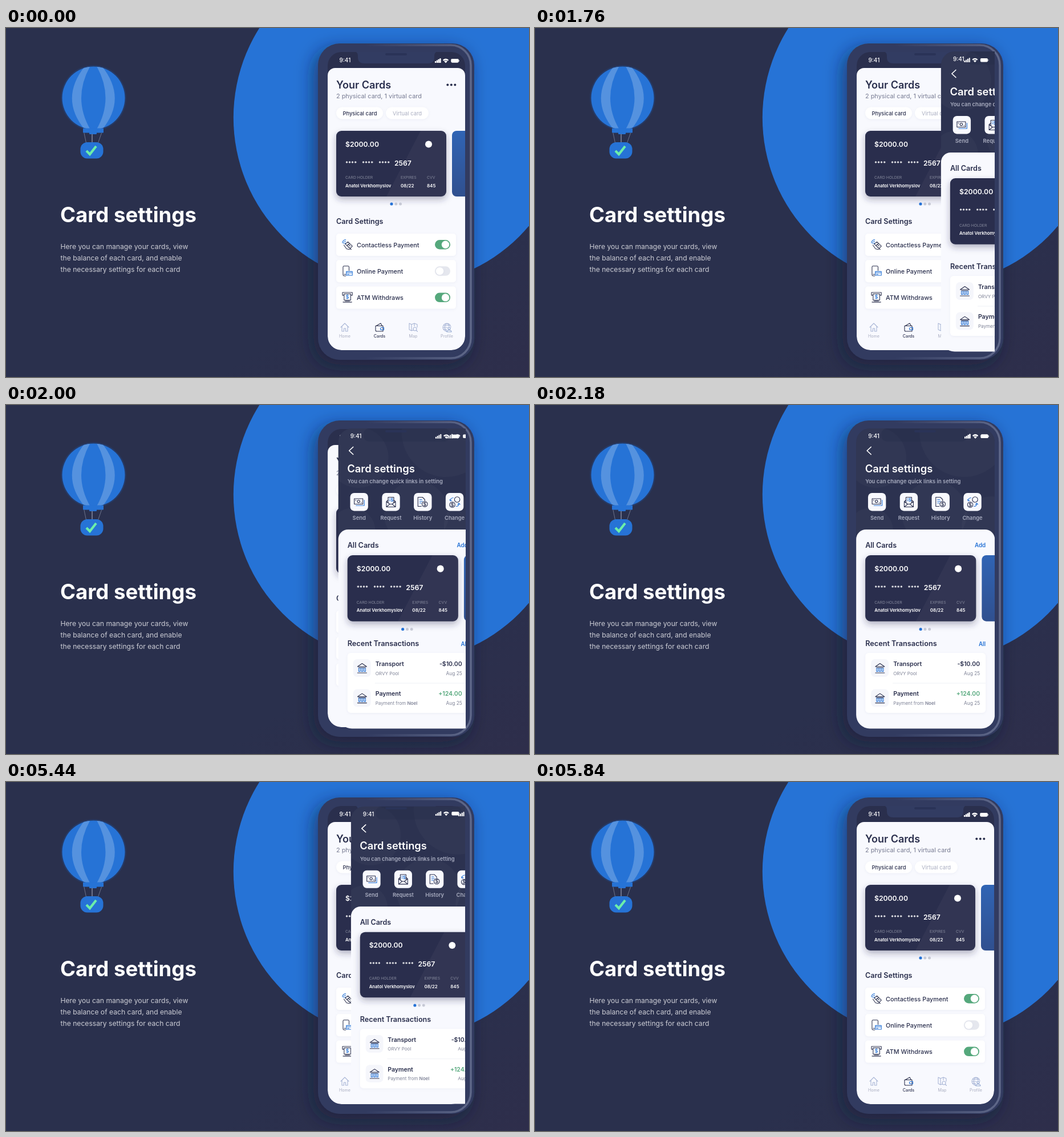
An HTML page for the animation above (8680 ms loop, 917 by 611 pixels).

```html
<!DOCTYPE html>
<html lang="en">
<head>
<meta charset="utf-8">
<title>Card settings</title>
<style>
html, body { margin: 0; height: 100%; overflow: hidden; background: #2a304d; }
svg { display: block; font-family: Inter, sans-serif; }
.icon { fill: none; stroke-linecap: round; stroke-linejoin: round; }
</style>
</head>
<body>
<svg id="stage" width="917" height="611" viewBox="0 0 917 611"></svg>
<script>
const NAVY = '#2a2f4d', BLUE = '#2673d6', MUTED = '#7f8397', PALE = '#a9adc0', GREEN = '#55a87c';

const text = (x, y, str, size, weight = 400, fill = NAVY, anchor = 'start') =>
  `<text x="${x}" y="${y}" font-size="${size}" font-weight="${weight}" fill="${fill}" text-anchor="${anchor}">${str}</text>`;
const rect = (x, y, w, h, r, fill, extra = '') =>
  `<rect x="${x}" y="${y}" width="${w}" height="${h}" rx="${r}" fill="${fill}" ${extra}/>`;
const dot = (x, y, r, fill, extra = '') => `<circle cx="${x}" cy="${y}" r="${r}" fill="${fill}" ${extra}/>`;
const at = (x, y, body, scale = 1) => `<g transform="translate(${x} ${y}) scale(${scale})">${body}</g>`;
const line = (d, color, width = 1.1) => `<path class="icon" d="${d}" stroke="${color}" stroke-width="${width}"/>`;
const ring = (x, y, r, color) => dot(x, y, r, 'none', `stroke="${color}" stroke-width="1.1"`);
const dollar = (x, y, size, color) => text(x, y, '$', size, 600, color, 'middle');
const soft = 'filter="url(#soft)"';

const icons = {
  contactless: line('M1 7a6 6 0 0 1 6-6M3 8a4 4 0 0 1 4-4M5 8.5l2-1.5', BLUE)
    + line('M6 9l5-4 8 8-4 4zM9 12l5-4M3.5 11l5 7 6 1M11 14l6 5M12 10l3 3', NAVY),
  online: line('M13 9V3a2 2 0 0 0-2-2H4a2 2 0 0 0-2 2v14a2 2 0 0 0 2 2h3M4 16h3', NAVY)
    + line('M8 11h11v7h-11zM8 13.5h11M10 16h3', BLUE),
  atm: line('M4 6H1V1h18v5h-3M4 3.5h12V15H4zM2 18.5h16M6 16.5h8', NAVY) + dollar(10, 12.7, 9, BLUE),
  home: line('M1 8L8 1l7 7M3 7v8h3.5v-5h3v5H13V7', '#a9b6d6'),
  wallet: line('M1 5.5h13v9.5H3a2 2 0 0 1-2-2zM2 5.5L10 1l2.5 4.5', NAVY)
    + line('M15.5 8.5h-4a2 2 0 0 0 0 4h4z', BLUE),
  map: line('M1 1l4 2 5-2 5 2v5M1 1v11l4 2 3-1M5 3v11M10 1v5M13.5 13.5l2 2', '#a9b6d6') + ring(11, 11, 3, '#a9b6d6'),
  profile: line('M15 8A7 7 0 1 0 8 15M1 8h8M8 1c-5 4-5 10 0 14M8 1c3 2 4 3 4 6M2.5 4.5h11M2.5 11.5h5', '#a9b6d6')
    + ring(12, 10, 2, '#8fa5cf') + line('M8 16c0-4 8-4 8 0z', '#8fa5cf'),
  send: line('M18.5 3.5V13H4', BLUE) + line('M1 1h15v9.5H1zM3 3.5h1M13 8h1', NAVY) + ring(8.5, 5.7, 2.2, NAVY),
  request: line('M4 6L1 8.5V18h16V8.5L14 6M1 18l6-5h4l6 5M1 8.5l6 4.5M17 8.5L11 13M4 11V1h10v10', NAVY)
    + line('M6 4h2M6 7h2', BLUE) + dollar(11, 8.5, 8, BLUE),
  history: line('M7 17H1V1h8l4 4v2', NAVY) + line('M4 5h4M4 8h5M4 11h3', BLUE)
    + ring(13, 13, 4.8, NAVY) + dollar(13, 16.1, 8.5, NAVY),
  change: ring(5.5, 14, 4.7, NAVY) + dollar(5.5, 17.1, 8.5, NAVY) + ring(14, 5, 4.7, NAVY)
    + line('M2 7c0-3 2-5 5-5M1 5l1 2.5 2.5-1M17 12c0 3-2 5-5 5M15 13.5l2-2 2 2', BLUE),
  bank: line('M1 6.5L9 1l8 5.5zM1 17.5h16M3 8.5h12', NAVY)
    + line('M3 9v6h2.5V9M7.75 9v6h2.5V9M12.5 9v6H15V9', BLUE),
};

const statusIcons = [0, 1, 2, 3].map(i => rect(i * 2.8, 2.5 - i * 1.6, 2, 3 + i * 1.6, .5, '#fff')).join('')
  + '<path d="M14 .5Q19 -4 24 .5L22.6 2Q19 -1 15.4 2ZM16.3 2.8Q19 .7 21.7 2.8L19 5.7Z" fill="#fff"/>'
  + rect(28.5, -1.5, 13, 6.5, 1.8, '#fff') + rect(42, .5, 1, 2.5, .5, '#b9bccb');

const pager = (x, y) => dot(x, y, 2.6, BLUE) + dot(x + 7.8, y, 2.5, '#c6c9d5') + dot(x + 15.5, y, 2.5, '#c6c9d5');

const cardField = (x, label, value, size) =>
  text(x, 84, label, 6.8, 400, '#84889b') + text(x, 98.7, value, size, 600, '#fff');

const card = rect(0, 0, 193, 115, 9, NAVY, 'filter="url(#cardShadow)"')
  + '<path d="M148 0H184a9 9 0 0 1 9 9V106a9 9 0 0 1-9 9H88Z" fill="#fff" opacity=".035"/>'
  + text(16, 27.5, '$2000.00', 12.2, 600, '#fff')
  + [16, 45, 74].map(x => text(x, 59.5, '****', 9.4, 600, '#fff')).join('')
  + text(102, 61, '2567', 12.2, 600, '#fff')
  + cardField(16, 'CARD HOLDER', 'Anatol Verkhomyslov', 7.8) + cardField(113, 'EXPIRES', '08/22', 8) + cardField(159, 'CVV', '845', 8)
  + dot(162, 23.5, 6, '#fff')
  + rect(203, 0, 60, 115, 8, 'url(#blueCard)');

const settingRow = ([label, icon, on], i) => {
  const y = 360 + i * 46.3;
  return rect(579, y, 210, 39, 5, '#fff', soft) + at(589, y + 9.5, icons[icon], .96) + text(615, y + 23.5, label, 10.8, 500)
    + rect(752, y + 11, 27, 16.5, 8.25, on ? GREEN : '#e5e7ee') + dot(on ? 770.5 : 760.5, y + 19.3, 6.7, '#fff', on ? '' : soft);
};

const tab = ([label, icon, x], i) => at(x - 8, 516, icons[icon])
  + text(x, 542, label, 7.2, i === 1 ? 500 : 400, i === 1 ? NAVY : PALE, 'middle');

const cardsScreen = rect(564, 42, 241, 100, 22, '#2a2f4d')
  + '<path d="M612 41q5 2 5 8v2q0 11 11 11H740q11 0 11-11V49q0-6 5-8Z" fill="#323c62"/>'
  + text(584.5, 60.3, '9:41', 10, 500, '#fff') + at(752, 55.5, statusIcons)
  + '<path d="M564 83a13 13 0 0 1 13-13H792a13 13 0 0 1 13 13V540a24 24 0 0 1-24 24H588a24 24 0 0 1-24-24Z" fill="#f8f9fe"/>'
  + text(579, 105.7, 'Your Cards', 18, 600) + [774.3, 780.8, 787.3].map(x => dot(x, 99.5, 2, NAVY)).join('')
  + text(579, 123.2, '2 physical card, 1 virtual card', 10.9, 400, '#777b92')
  + rect(579, 138.5, 82, 21, 10.5, '#fff', soft) + text(620.5, 152.5, 'Physical card', 9.4, 500, NAVY, 'middle')
  + rect(666, 138.5, 75, 21, 10.5, '#fff', soft) + text(703.5, 152.5, 'Virtual card', 9.4, 400, PALE, 'middle')
  + at(579, 180, card) + pager(676, 308)
  + text(579, 342.5, 'Card Settings', 12.6, 600)
  + [['Contactless Payment', 'contactless', 1], ['Online Payment', 'online', 0], ['ATM Withdraws', 'atm', 1]].map(settingRow).join('')
  + [['Home', 'home', 594], ['Cards', 'wallet', 655], ['Map', 'map', 714], ['Profile', 'profile', 773]].map(tab).join('');

const quickLink = ([label, icon, w], i) => {
  const x = 599.5 + i * 55.8;
  return rect(x - 15.7, 154, 31.4, 31.4, 7, '#f8f9fe') + at(x - w / 2, icon === 'send' ? 163 : 160.5, icons[icon])
    + text(x, 201.2, label, 9.4, 600, PALE, 'middle');
};

const transaction = ([title, note, sum, color], i) => {
  const y = 445 + i * 52.6;
  return rect(589, y, 31, 31, 7, '#f5f6fb') + at(595.7, y + 6.5, icons.bank)
    + text(628, y + 11.8, title, 10.6, 600) + text(628, y + 27.5, note, 8.1, 400, MUTED)
    + text(780, y + 11.8, sum, 10.5, 600, color, 'end') + text(780, y + 27.5, 'Aug 25', 8.3, 400, MUTED, 'end');
};

const settingsScreen = rect(563, 41, 243, 250, 24, '#2c3250')
  + '<g fill="#fff" fill-opacity=".025" clip-path="url(#header)">'
  + [[598, 92, 53], [752, 48, 78], [700, 190, 57], [800, 212, 52], [588, 220, 40]].map(([x, y, r]) => `<circle cx="${x}" cy="${y}" r="${r}"/>`).join('') + '</g>'
  + rect(607, 41, 152, 23, 10, '#272d4a', 'opacity=".4"')
  + text(584, 58.2, '9:41', 10, 500, '#fff') + at(753, 53, statusIcons)
  + line('M589 73.5L582 80L589 86.5', '#fff', 1.7)
  + text(578.5, 117.5, 'Card settings', 18.4, 600, '#fff')
  + text(579, 137.3, 'You can change quick links in setting', 9.4, 600, PALE)
  + [['Send', 'send', 19], ['Request', 'request', 18], ['History', 'history', 19], ['Change', 'change', 19]].map(quickLink).join('')
  + '<path d="M563 235a17 17 0 0 1 17-17H789a17 17 0 0 1 17 17V542.5a24 24 0 0 1-24 24H587a24 24 0 0 1-24-24Z" fill="#f8f9fe"/>'
  + text(579, 249.8, 'All Cards', 12.6, 600) + text(790, 249, 'Add', 9.8, 600, BLUE, 'end')
  + at(579, 263, card, 1.006) + pager(676, 392.5)
  + text(579, 422, 'Recent Transactions', 12.7, 600) + text(790, 421.5, 'All', 9.8, 600, BLUE, 'end')
  + rect(579, 434, 211, 105, 6, '#fff', soft) + rect(627, 486.5, 163, 1, 0, '#f0f1f6')
  + [['Transport', 'ORVY Pool', '-$10.00', NAVY],
     ['Payment', 'Payment from <tspan font-weight="600">Noel</tspan>', '+124.00', GREEN]].map(transaction).join('');

const stripe = 'M139 66Q93 123 138 178H148Q116 123 148 66Z';
const balloon = dot(153.5, 122.5, 57.3, '#263a66') + dot(153.5, 122.5, 55, BLUE)
  + `<g fill="#5592df" clip-path="url(#envelope)"><path d="${stripe}"/><path d="${stripe}" transform="matrix(-1 0 0 1 306.5 0)"/></g>`
  + rect(135, 175.5, 36, 8, 1, BLUE) + rect(146, 182, 13, 4, 1, BLUE)
  + line('M137 184L140.5 201M150.5 186V201M151.5 186V201M167.5 184L161.5 201', '#747b92', .9)
  + rect(130.5, 200, 40, 28.5, 12, BLUE) + '<path d="M141 215L147 221L158 207" fill="none" stroke="#6ceeaa" stroke-width="4.2"/>';

const shadow = (id, dx, dy, blur, color, opacity) =>
  `<filter id="${id}" x="-30%" y="-60%" width="160%" height="220%"><feDropShadow dx="${dx}" dy="${dy}" stdDeviation="${blur}" flood-color="${color}" flood-opacity="${opacity}"/></filter>`;
const gradient = (id, dir, ...stops) => `<linearGradient id="${id}" ${dir}>`
  + stops.map(([o, c, a = 1]) => `<stop offset="${o}" stop-color="${c}" stop-opacity="${a}"/>`).join('') + '</linearGradient>';

document.getElementById('stage').innerHTML = '<defs>'
  + shadow('soft', 0, 1, 2, '#9aa3c4', .14) + shadow('cardShadow', 0, 5, 6, NAVY, .35) + shadow('phoneShadow', -8, 9, 15, '#141a38', .58)
  + gradient('back', 'x2="1" y2="1"', [.7, '#2a304d'], [1, '#2e2e4b'])
  + gradient('blueCard', 'x2="0" y2="1"', [0, '#3064b4'], [1, '#30508f'])
  + gradient('rim', '', [.3, '#5f6889', 0], [1, '#5f6889'])
  + '<clipPath id="screen"><rect id="window" x="563" y="41" width="243" height="526"/></clipPath>'
  + '<clipPath id="base"><rect x="564" y="42" width="241" height="522" rx="24"/></clipPath>'
  + '<clipPath id="header"><rect x="563" y="41" width="243" height="200" rx="24"/></clipPath>'
  + '<clipPath id="envelope"><circle cx="153.5" cy="122.5" r="55"/></clipPath></defs>'
  + rect(0, 0, 917, 611, 0, 'url(#back)') + dot(692.5, 157, 293.7, BLUE) + balloon
  + text(95, 340, 'Card settings', 36.6, 700, '#fff')
  + ['Here you can manage your cards, view', 'the balance of each card, and enable', 'the necessary settings for each card']
    .map((s, i) => text(95.5, 387 + i * 20, s, 12.15, 400, '#cccdd5')).join('')
  + rect(547, 27, 274, 554, 38, '#313b60', 'filter="url(#phoneShadow)"')
  + rect(550, 30, 265, 548, 35, 'none', 'stroke="url(#rim)" stroke-width="3.5"')
  + `<g clip-path="url(#base)">${cardsScreen}</g>`
  + `<g clip-path="url(#screen)"><g id="slider">${settingsScreen}</g></g><g id="status">${statusIcons}</g>`
  + rect(665, 44, 38, 4, 2, '#2a3357');

const [slider, statusBar, screenWindow] = ['slider', 'status', 'window'].map(id => document.getElementById(id));

function bezier(t, x1, y1, x2, y2) {
  if (t <= 0 || t >= 1) return t <= 0 ? 0 : 1;
  const curve = (s, a, b) => 3 * (1 - s) ** 2 * s * a + 3 * (1 - s) * s * s * b + s ** 3;
  let lo = 0, hi = 1;
  for (let i = 0; i < 24; i++) {
    const mid = (lo + hi) / 2;
    if (curve(mid, x1, x2) < t) lo = mid; else hi = mid;
  }
  return curve(lo, y1, y2);
}

function frame() {
  const t = performance.now() % 8680;
  const enter = bezier((t - 1622) / 578, .25, .1, .25, 1);
  const leave = bezier((t - 5297) / 500, .42, 0, .58, 1);
  const shown = enter - leave;
  const shrink = Math.min(1, leave * 6);
  slider.setAttribute('transform', `translate(${563 + 243 * (1 - shown)} 225) scale(${1 - .009 * shrink}) translate(-563 -225)`);
  slider.setAttribute('visibility', shown > 0 ? 'visible' : 'hidden');
  screenWindow.setAttribute('width', 243 - shrink);
  statusBar.setAttribute('transform', `translate(${752 + shown} ${55.5 - 2.5 * shown})`);
  requestAnimationFrame(frame);
}
frame();
</script>
</body>
</html>
```
